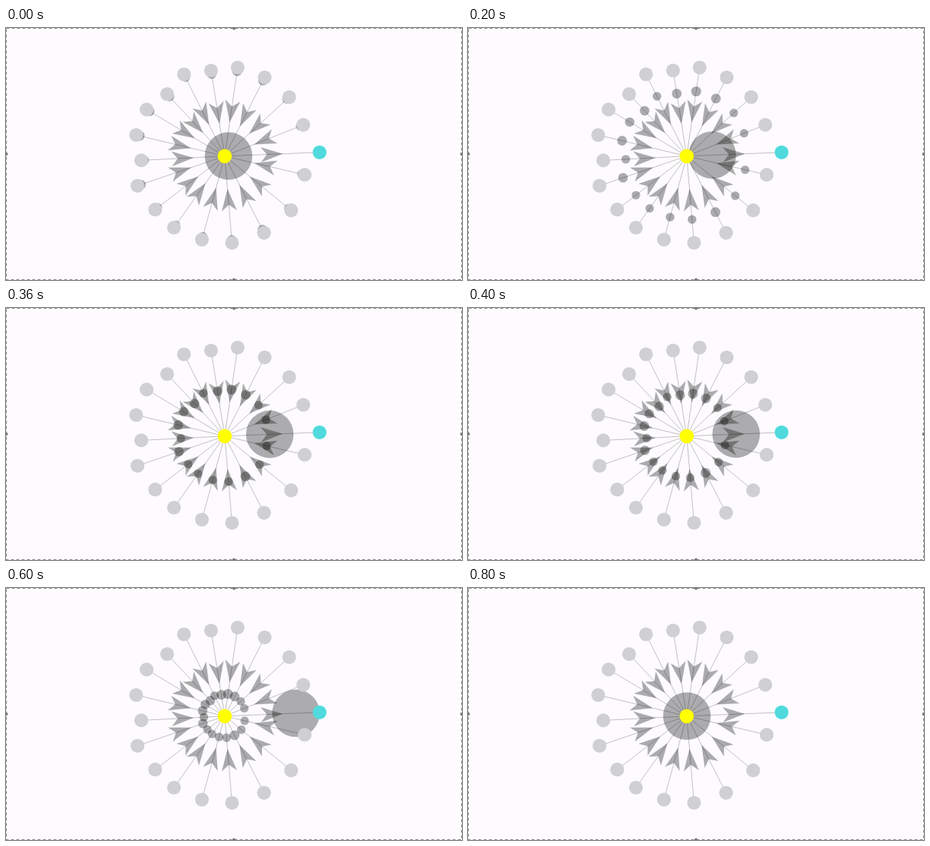
An HTML page with a canvas that plays this animation: 600 by 332 pixels, repeating every 0.84 s.

```html
<!DOCTYPE html>
<html>
<head>
<meta charset="utf-8">
<style>
  html, body { margin: 0; width: 100%; height: 100%; overflow: hidden; background: #fdfbfe; }
  canvas { display: block; }
</style>
</head>
<body>
<canvas id="stage" width="600" height="332"></canvas>
<script>
const ctx = document.getElementById('stage').getContext('2d');
const SHADE = 'rgba(0,0,0,0.32)';
const hub = [287.8, 168.8];
const target = [412.6, 163.8];
// x, y, radius of the travelling dot
const nodes = [
  [234.2, 61, 5.7], [269.8, 56, 6.4], [304.8, 52, 6.6], [340.4, 65, 6.4],
  [372.6, 91, 5.6], [391.2, 127.6, 5.6], [393, 193.4, 5.6], [375.2, 240.2, 5.7],
  [339.5, 269.8, 6.5], [297.4, 283, 5.7], [257.8, 278.8, 5.7], [221, 263, 5.6],
  [196.3, 239.2, 5.6], [173, 207.8, 6.3], [178, 174.4, 5.7], [171.3, 141, 6.4],
  [185, 107.4, 6.2], [212, 87, 6.3]
];

const mix = (a, b, p) => [a[0] + (b[0] - a[0]) * p, a[1] + (b[1] - a[1]) * p];

function disc([x, y], r, color) {
  ctx.fillStyle = color;
  ctx.beginPath();
  ctx.arc(x, y, r, 0, Math.PI * 2);
  ctx.fill();
}

function link(from, to) {
  ctx.strokeStyle = 'rgba(0,0,0,0.3)';
  ctx.lineWidth = 0.8;
  ctx.beginPath();
  ctx.moveTo(...from);
  ctx.lineTo(...to);
  ctx.stroke();

  ctx.save();
  ctx.translate(...mix(from, to, 0.5));
  ctx.rotate(Math.atan2(to[1] - from[1], to[0] - from[0]));
  ctx.fillStyle = SHADE;
  ctx.beginPath();
  ctx.moveTo(14, 0);
  ctx.lineTo(-15, 10);
  ctx.lineTo(-7, 0);
  ctx.lineTo(-15, -10);
  ctx.fill();
  ctx.restore();
}

function selectionFrame() {
  ctx.strokeStyle = '#858485';
  ctx.lineWidth = 1;
  ctx.setLineDash([4, 3]);
  ctx.strokeRect(0.5, 0.5, 599, 331);
  ctx.setLineDash([]);
  for (const p of [[300, 0.5], [300, 331.5], [0.5, 166], [599.5, 166]]) disc(p, 2, '#777');
}

// Steady steps with a slightly longer one every tenth tick
function progress(ms) {
  const n = Math.floor(ms % 840 / 40);
  return (0.04 + 0.0459 * n + 0.022 * Math.floor((n + 1) / 10)) % 1;
}

function draw(now) {
  const p = progress(now);
  ctx.fillStyle = '#fdfbfe';
  ctx.fillRect(0, 0, 600, 332);

  for (const node of nodes) link(node, hub);
  link(hub, target);
  for (const node of nodes) disc(mix(node, hub, p), node[2], SHADE);
  disc(mix(hub, target, p), 31.3, SHADE);

  for (const node of nodes) disc(node, 9.1, '#d0cfd1');
  disc(target, 9.1, '#50dade');
  disc(hub, 9.4, '#ff0');
  selectionFrame();
}

const start = performance.now();
function loop() {
  draw(performance.now() - start);
  requestAnimationFrame(loop);
}
loop();
</script>
</body>
</html>
```
